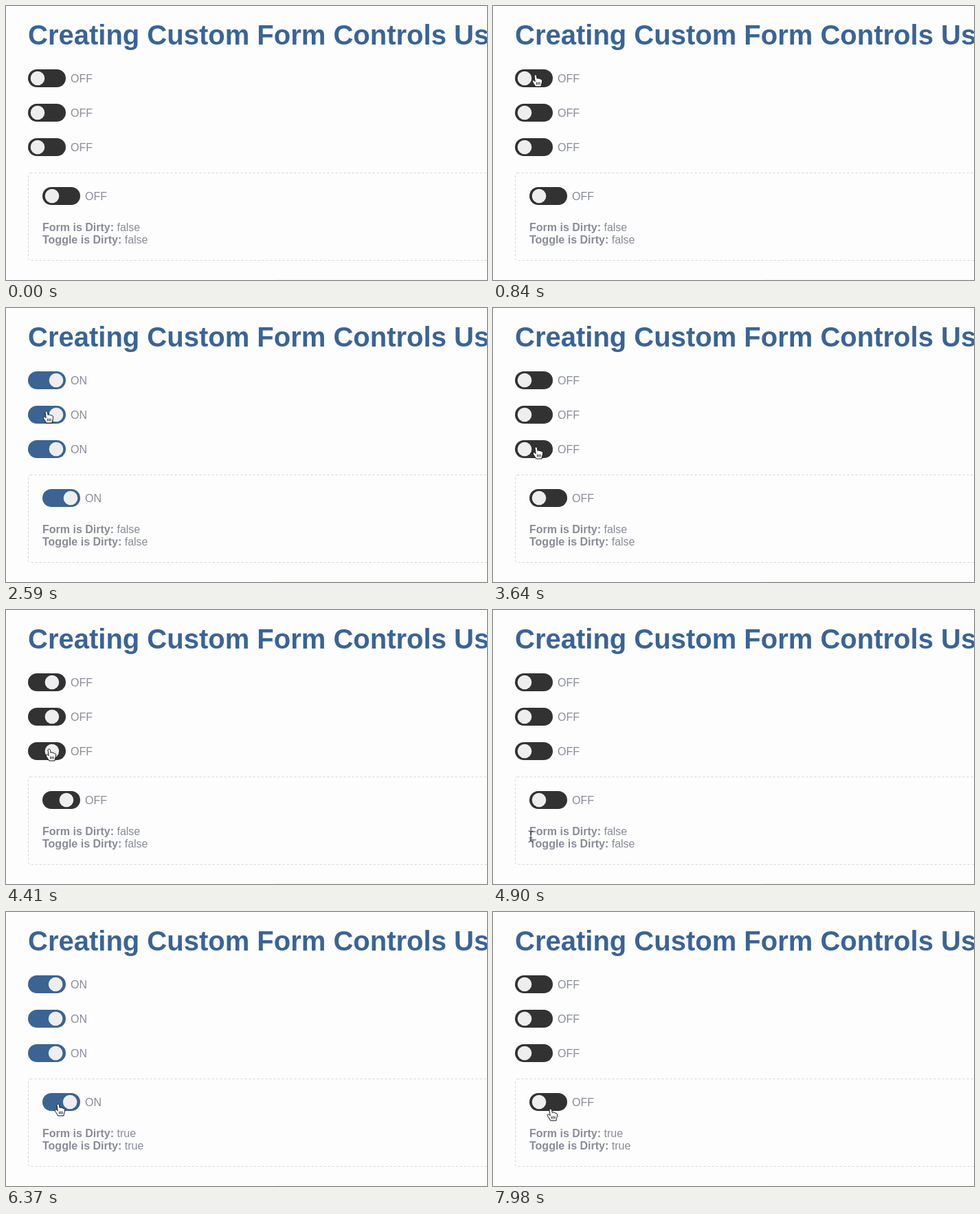
An HTML page that plays this animation: 700 by 398 pixels, repeating every 8 s.

```html
<!DOCTYPE html>
<html lang="en">
<head>
<meta charset="utf-8">
<title>Custom toggle controls</title>
<style>
  html, body { margin: 0; width: 100%; height: 100%; overflow: hidden; background: #fdfdfd; }
  svg { display: block; width: 700px; height: 398px; font: 16px "Liberation Sans", Arial, sans-serif; fill: #898c98; }
  .title { font-size: 40px; font-weight: bold; fill: #3a6496; }
  .bold { font-weight: bold; }
  .knob { fill: #eeeef0; }
  .card { fill: none; stroke: #d2d5db; stroke-dasharray: 3 3; }
  #cursor path { fill: #fff; stroke: #111; stroke-linejoin: round; stroke-linecap: round; }
  #cursor .line { fill: none; }
</style>
</head>
<body>
<svg id="stage" viewBox="0 0 700 398">
  <rect width="700" height="398" fill="#fdfdfd"/>
  <text class="title" x="32" y="56">Creating Custom Form Controls Using</text>
  <rect class="card" x="32.5" y="242.5" width="720" height="127" rx="3"/>
  <path d="M392 397.5H700" stroke="#f6f6f6"/>
  <g id="toggles"></g>
  <text x="53" y="327"><tspan class="bold">Form is Dirty:</tspan> <tspan class="dirty">false</tspan></text>
  <text x="53" y="345"><tspan class="bold">Toggle is Dirty:</tspan> <tspan class="dirty">false</tspan></text>
  <g id="cursor">
    <g data-kind="hand">
      <path d="M-2 1.5C-2-.5 1-.5 1.4 1.4L2.3 5.6C2.6 4.4 4.8 4.4 5 6C5.6 5 7.3 5.2 7.5 6.8C8.2 6 9.6 6.6 9.6 8.2C9.8 11 8.4 13 8 17H-.5C-1 14.5-4.8 11.2-4.8 9C-4.8 7.2-2.6 7.4-1 9.4Z"/>
      <path class="line" d="M1.6 11v3M3.8 11v3M6 11v3"/>
    </g>
    <g data-kind="arrow"><path d="M0 0V15L3.5 11.8L6 17.2L8.4 16.2L6 11H10.8Z" style="fill:#111;stroke:#fff"/></g>
    <g data-kind="beam"><path class="line" d="M-3-8Q0-8 0-6Q0-8 3-8M0-6V6M-3 8Q0 8 0 6Q0 8 3 8M-2 2H2" style="stroke:#222b3c"/></g>
  </g>
</svg>
<script>
const LOOP = 8000, STEP = 70, SLIDE = 100, TRAVEL = 27;
const clicks = [1120, 1960, 2450, 3150, 3710, 4410, 6300, 7350];
const DIRTY_AT = 6300;

// time, x, y of the pointer's hot spot
const route = [
  [70, 400, 392], [840, 62, 100], [2030, 62, 100], [2380, 59, 150],
  [3150, 59, 150], [3570, 63, 202], [4480, 63, 202], [4900, 55, 329],
  [5250, 100, 333], [5880, 76, 279], [7910, 76, 279], [7980, 84, 286]
];
const spots = [[32, 92], [32, 142], [32, 192], [53, 263]];

document.getElementById('toggles').innerHTML = spots.map(([x, y]) => `
  <g transform="translate(${x} ${y})">
    <rect class="track" width="55" height="26" rx="13"/>
    <circle class="knob" cx="14" cy="13" r="10.3"/>
    <text class="state" x="62" y="19">OFF</text>
  </g>`).join('');

const all = selector => [...document.querySelectorAll(selector)];
const tracks = all('.track'), knobs = all('.knob'), states = all('.state'), dirty = all('.dirty');
const cursor = document.getElementById('cursor');
const setText = (nodes, text) => nodes.forEach(n => { if (n.textContent !== text) n.textContent = text; });
const smooth = p => p * p * (3 - 2 * p);

function pointerAt(t) {
  const next = route.findIndex(([time]) => time >= t);
  if (next < 1) return route[next < 0 ? route.length - 1 : 0].slice(1);
  const [t0, x0, y0] = route[next - 1], [t1, x1, y1] = route[next];
  const p = smooth((t - t0) / (t1 - t0));
  return [x0 + (x1 - x0) * p, y0 + (y1 - y0) * p];
}

function pointerKind(x, y) {
  const overToggle = spots.some(([sx, sy]) => x >= sx && x <= sx + 94 && y >= sy && y <= sy + 26);
  if (overToggle) return 'hand';
  return x >= 53 && x <= 207 && y >= 311 && y <= 349 ? 'beam' : 'arrow';
}

function drawToggles(t) {
  const past = clicks.filter(c => c <= t);
  const on = past.length % 2 === 1;
  // the slide is already under way when the click becomes visible
  const p = past.length ? Math.min(1, (t - past[past.length - 1] + 12) / SLIDE) : 1;
  const moved = 1 - (1 - p) ** 2;
  const cx = 14 + TRAVEL * (on ? moved : 1 - moved);
  tracks.forEach(track => track.setAttribute('fill', on ? '#3b6492' : '#323232'));
  knobs.forEach(knob => knob.setAttribute('cx', cx));
  setText(states, on ? 'ON' : 'OFF');
  setText(dirty, String(t >= DIRTY_AT));
}

function drawCursor(t) {
  const [x, y] = pointerAt(t), kind = pointerKind(x, y);
  cursor.setAttribute('visibility', t < route[0][0] ? 'hidden' : 'visible');
  cursor.setAttribute('transform', `translate(${x} ${y})`);
  for (const shape of cursor.children) shape.style.display = shape.dataset.kind === kind ? '' : 'none';
}

function frame() {
  const t = Math.floor(performance.now() % LOOP / STEP) * STEP;
  drawToggles(t);
  drawCursor(t);
  requestAnimationFrame(frame);
}
frame();
</script>
</body>
</html>
```
